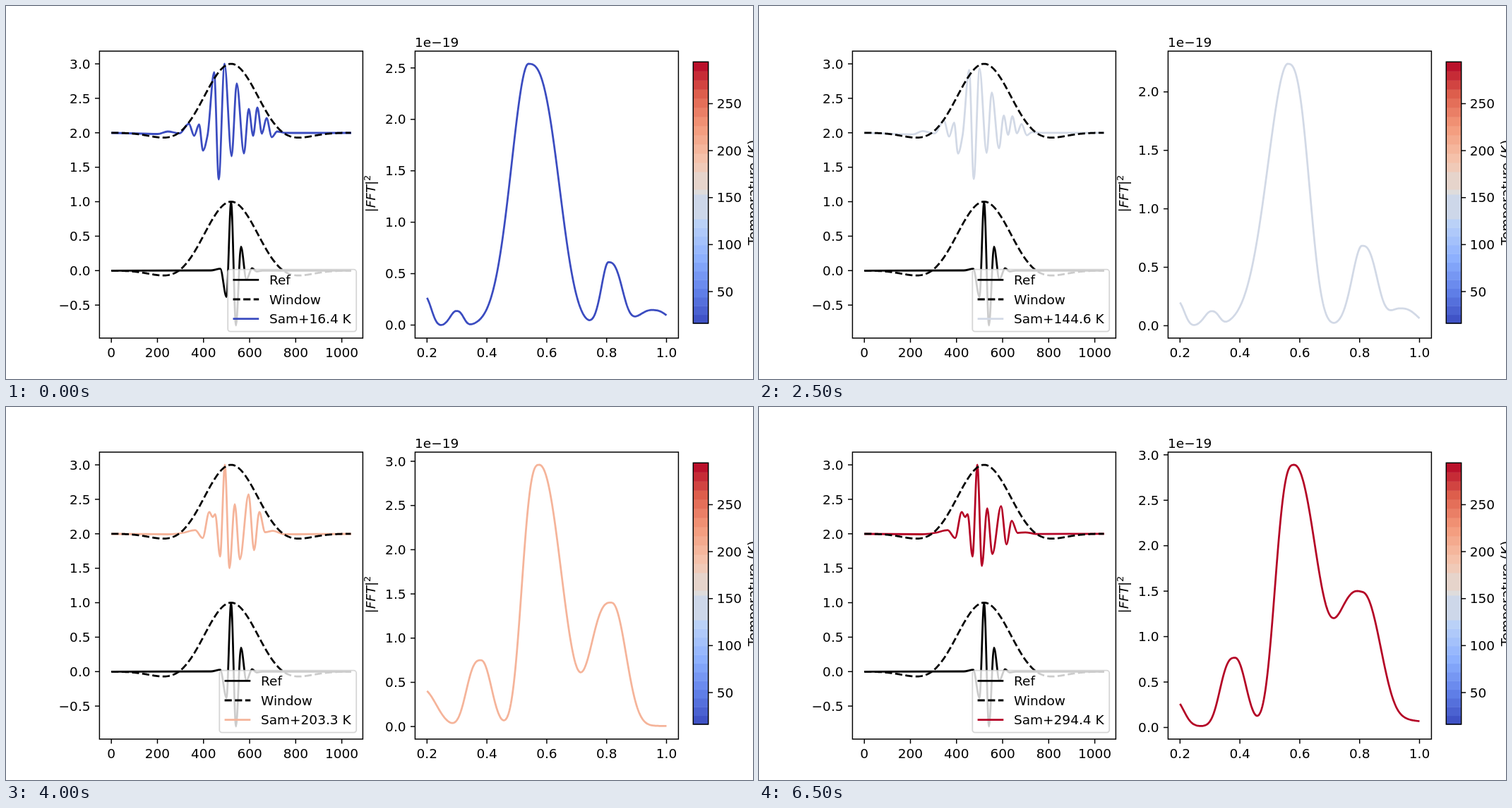
These frames come from a looping animation (1058 by 529 pixels, 7 s). An HTML page with a canvas:

```html
<!DOCTYPE html>
<html>
<head>
<meta charset="utf-8">
<style>
html, body { margin: 0; width: 100%; height: 100%; overflow: hidden; background: #fff; }
canvas { display: block; }
</style>
</head>
<body>
<canvas id="stage" width="1058" height="529"></canvas>
<script>
const ctx = document.getElementById('stage').getContext('2d');
const PT = 1058 / 576;
const LINE = 1.5 * PT, THIN = 0.8 * PT, TICK = 3.5 * PT;
const DASH = [3.7 * LINE, 1.6 * LINE];
const font = (size, style = '') => `${style} ${size}px "DejaVu Sans", sans-serif`;
const SIZE = 18.5, STEP_MS = 500;
const TOP = 82, FLOOR = 452.4, MIDLINE = 179.8, BASELINE = 375.3, UNIT = 97.75;

const temps = [16.4, 44.6, 73.1, 101.3, 122.9, 144.6, 164.5, 184.4, 203.3, 222.1, 240.2, 258.4, 276.4, 294.4];
const maxima = [2.54, 2.56, 2.457, 2.61, 2.38, 2.24, 2.3, 2.35, 2.96, 3.08, 3.13, 3.19, 3.06, 2.89];

// Each phase has one pulse that drifts and fades after its center (and grows up to `lead` before it),
// and spectral peaks [x, height, left width, right width] that move from `start` to `end`.
const cold = {
  first: 0, last: 7, zero: [452.5, 453.8], drift: 4, center: 300, lead: 40, rise: 1.9, fall: 2.8,
  pulse: [[149.2, 180], [215, 181.5], [229, 178], [246, 180.5], [259, 167], [266.5, 184], [273.5, 168], [279, 205],
    [285.5, 183], [294.8, 94], [301.3, 246], [309.5, 82], [319.5, 213], [326.8, 110], [337, 209], [343.8, 146],
    [350, 184], [356, 144], [362.5, 181], [369, 159], [376.5, 186], [384, 178], [396, 180], [489, 180]],
  start: [[588, 46, 9, 17], [637.3, 21.5, 12, 13], [739.8, 370, 34.8, 52], [853, 90, 14, 24], [914, 23, 28, 30]],
  end: [[588, 35, 9, 17], [641, 20, 14, 15], [752.5, 370, 43.5, 30], [854, 122, 22, 27], [905, 26, 25, 30]]
};
const warm = {
  first: 9, last: 13, zero: [453.2, 454.5], drift: -0.8, center: 310, lead: 0, rise: 2.8, fall: 2.2,
  pulse: [[149.2, 180], [232, 180.5], [250, 178.5], [268, 174.7], [278.5, 185.8], [287.9, 149], [292.8, 156],
    [296.3, 152], [303.2, 212], [310, 82], [316.5, 228.5], [324, 138], [331.3, 216], [343.6, 124], [351.3, 203],
    [358.8, 149], [367, 177.5], [378, 175.7], [394, 180.5], [489, 180]],
  start: [[588, 54, 9, 28], [672.5, 94, 24.5, 20], [755, 370, 29, 42], [857.5, 175, 36, 27.5], [930, 1, 25, 30]],
  end: [[588, 38, 9, 18], [674, 97, 25, 21], [757.5, 370, 31.5, 46], [854.5, 188, 42, 35], [930, 7, 25, 30]]
};
const refPulse = [[149.2, 375.3], [290, 375], [303.5, 372.6], [312.3, 412.5], [318.8, 278], [325.7, 453],
  [332.8, 341.5], [340.5, 388], [348.5, 372], [355, 376.5], [363, 375.3], [489, 375.3]];
const coolwarm = [[59, 76, 192], [98, 130, 234], [141, 176, 254], [184, 208, 249], [221, 221, 221],
  [245, 196, 173], [244, 154, 123], [222, 96, 77], [180, 4, 38]];

const mix = (a, b, t) => a + (b - a) * t;

function heat(f) {
  const i = Math.min(7, Math.floor(f * 8));
  return `rgb(${coolwarm[i].map((c, k) => Math.round(mix(c, coolwarm[i + 1][k], f * 8 - i)))})`;
}

function stroke(color, width = LINE, dash = []) {
  ctx.strokeStyle = color;
  ctx.lineWidth = width;
  ctx.setLineDash(dash);
  ctx.stroke();
  ctx.setLineDash([]);
}

function polyline(points, color, width, dash) {
  ctx.beginPath();
  points.forEach(([x, y]) => ctx.lineTo(x, y));
  stroke(color, width, dash);
}

const segment = (x1, y1, x2, y2, color = '#000', width = THIN, dash) =>
  polyline([[x1, y1], [x2, y2]], color, width, dash);

function text(str, x, y, align = 'left') {
  ctx.fillStyle = '#000';
  ctx.textAlign = align;
  ctx.fillText(str, x, y);
}

// Smooth monotone curve: flat at each extremum.
function curve(pts, color) {
  const rise = i => (pts[i + 1][1] - pts[i][1]) / (pts[i + 1][0] - pts[i][0]);
  const slope = i => {
    if (i === 0 || i === pts.length - 1) return 0;
    const a = rise(i - 1), b = rise(i);
    return a * b > 0 ? 2 * a * b / (a + b) : 0;
  };
  ctx.beginPath();
  ctx.moveTo(...pts[0]);
  for (let i = 0; i < pts.length - 1; i++) {
    const [x1, y1] = pts[i], [x2, y2] = pts[i + 1], d = (x2 - x1) / 3;
    ctx.bezierCurveTo(x1 + d, y1 + d * slope(i), x2 - d, y2 - d * slope(i + 1), x2, y2);
  }
  stroke(color);
}

function flatTop(base) {
  const terms = [0.21558, -0.41663, 0.27726, -0.08358, 0.00695];
  const points = [];
  for (let i = 0; i <= 340; i++) {
    const w = terms.reduce((sum, a, k) => sum + a * Math.cos(k * 2 * Math.PI * i / 340), 0);
    points.push([149.2 + i * 339.2 / 340, base - UNIT * w]);
  }
  polyline(points, '#000', LINE, DASH);
}

function samplePulse({ pulse, drift, center, lead }, t, color) {
  const last = pulse.length - 1;
  curve(pulse.map(([x, y], i) => {
    const fade = Math.exp(-t * Math.max(x - center, -lead) / 95);
    return [i % last ? x + drift * t : x, MIDLINE + (y - MIDLINE) * fade];
  }), color);
}

function spectrum({ start, end, rise, fall }, t, color) {
  const peaks = start.map((peak, i) => peak.map((v, k) => mix(v, end[i][k], t)));
  const points = [];
  for (let x = 596.3; x <= 935.6; x += 1.06) {
    points.push([x, peaks.reduce((sum, [mid, height, left, right]) =>
      sum + height * Math.exp(-(x < mid ? ((mid - x) / left) ** rise : ((x - mid) / right) ** fall)), 0)]);
  }
  const values = points.map(p => p[1]), low = Math.min(...values), high = Math.max(...values);
  polyline(points.map(([x, v]) => [x, mix(FLOOR, TOP, (v - low) / (high - low))]), color);
}

function frame(x, y, w, h) {
  ctx.beginPath();
  ctx.rect(x, y, w, h);
  stroke('#000', THIN);
}

function xTick(x, label) {
  segment(x, 471, x, 471 + TICK);
  text(label, x, 497.8, 'center');
}

function yTick(edge, y, label) {
  segment(edge - TICK, y, edge, y);
  text(label, edge - 2 * TICK, y + 6.7, 'right');
}

function rotated(x, y, paint) {
  ctx.save();
  ctx.translate(x, y);
  ctx.rotate(-Math.PI / 2);
  paint();
  ctx.restore();
}

function legend(temp, color) {
  const label = `Sam+${temp.toFixed(1)} K`;
  const left = 302.3 + (temp < 100 ? 11.9 : 0);
  ctx.beginPath();
  ctx.roundRect(left, 373.7, 496.2 - left, 88, 2 * PT);
  ctx.fillStyle = 'rgba(255,255,255,0.8)';
  ctx.fill();
  stroke('rgba(204,204,204,0.8)', PT);
  const rows = [['Ref', '#000'], ['Window', '#000', DASH], [label, color]];
  rows.forEach(([name, ink, dash], i) => {
    const y = 388.3 + i * 27.7;
    segment(left + 7.3, y, left + 44, y, ink, LINE, dash);
    text(name, left + 58.7, y + 6.5);
  });
}

function colorbar() {
  const bottom = 450, top = 79.3;
  const edges = [];
  const bands = (from, to) => { for (let i = 0; i <= 12; i++) edges.push(mix(from, to, i / 12)); };
  bands(bottom, 302);
  edges.push(267, 260);
  bands(235, top);
  edges.slice(1).forEach((y, i) => {
    ctx.fillStyle = heat((bottom - (y + edges[i]) / 2) / (bottom - top));
    ctx.fillRect(973.3, y, 21.4, edges[i] - y + 0.5);
  });
  frame(973.3, top, 21.4, bottom - top);
  for (let t = 50; t <= 250; t += 50) {
    const y = 405 - (t - 50) * 1.3325;
    segment(994.7, y, 994.7 + TICK, y);
    text(t, 994.7 + 2 * TICK - 0.8, y + 6.7);
  }
  rotated(1063.5, 264.5, () => text('Temperature (K)', 0, 0, 'center'));
}

function spectrumLabel() {
  rotated(523, 292.5, () => {
    text('|', 0, 0);
    text('|', 38.4, 0);
    ctx.font = font(SIZE, 'oblique');
    text('FFT', 6.2, 0);
    ctx.font = font(SIZE * 0.7);
    text('2', 44.4, -7);
  });
}

function draw(step) {
  const phase = step <= cold.last ? cold : warm;
  const t = Math.max(0, (step - phase.first) / (phase.last - phase.first));
  const temp = temps[step], color = heat((temp - 16.4) / 278);
  ctx.fillStyle = '#fff';
  ctx.fillRect(0, 0, 1058, 529);
  ctx.font = font(SIZE);

  curve(refPulse, '#000');
  flatTop(BASELINE);
  samplePulse(phase, t, color);
  flatTop(MIDLINE);
  frame(132.4, 64, 373, 407);
  for (let v = 0; v <= 1000; v += 200) xTick(149.2 + v * 0.3264, v);
  for (let v = -0.5; v <= 3; v += 0.5) yTick(132.4, BASELINE - v * UNIT, v.toFixed(1).replace('-', '−'));
  legend(temp, color);

  spectrum(phase, t, color);
  frame(579.4, 64, 373, 407);
  for (let i = 0; i < 5; i++) xTick(596.3 + i * 84.8, (0.2 + i * 0.2).toFixed(1));
  const zero = mix(...phase.zero, t);
  for (let v = 0; v <= maxima[step] * 1.045; v += 0.5) {
    yTick(579.4, mix(zero, TOP, v / maxima[step]), v.toFixed(1));
  }
  text('1e−19', 579, 58);
  spectrumLabel();
  colorbar();
}

function tick() {
  draw(Math.floor(performance.now() / STEP_MS) % temps.length);
  requestAnimationFrame(tick);
}
tick();
</script>
</body>
</html>
```
